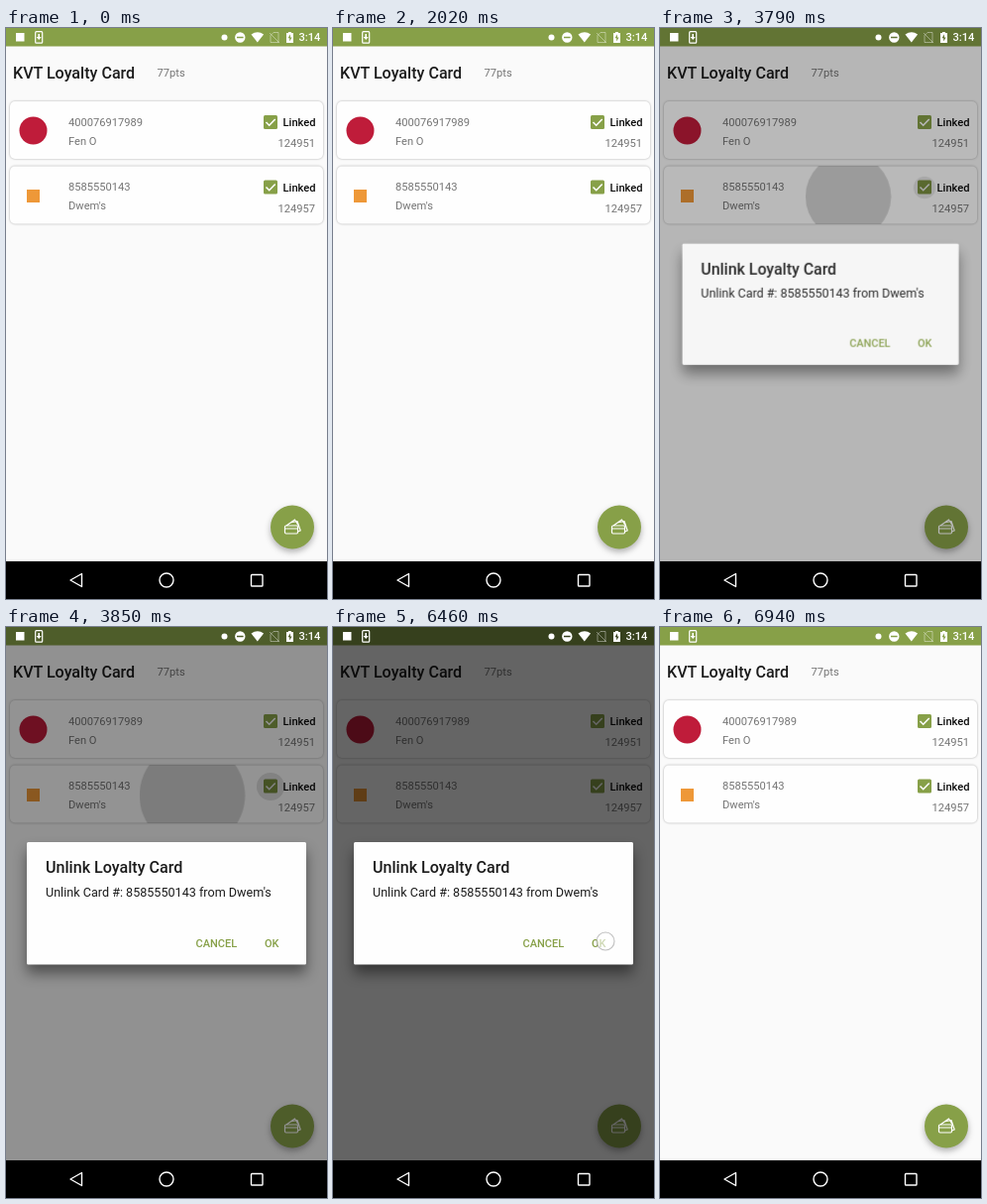
Recreate the animation shown at these times as an HTML page. Size 324 by 576 pixels, loop 8 s.

```html
<!DOCTYPE html>
<html lang="en">
<head>
<meta charset="utf-8">
<title>Loyalty cards</title>
<style>
  html, body { margin: 0; width: 100%; height: 100%; overflow: hidden; background: #fafafa; }
  svg { --green: #87a048; display: block; width: 100vw; height: 100vh; }
  text { font: 11.15px Roboto, sans-serif; fill: #757575; }
  .medium { font-weight: 500; }
  .title { font-size: 16.1px; font-weight: 500; fill: #1c1c1c; }
  .body { font-size: 12.6px; fill: #1c1c1c; }
  .dark { fill: #0c0c0c; }
  .action { font-size: 11px; font-weight: 500; fill: var(--green); }
  .end { text-anchor: end; }
  .green { fill: var(--green); }
  .card { fill: #fefefe; filter: drop-shadow(0 .8px .8px rgba(0, 0, 0, .32)); }
  .fab { fill: var(--green); filter: drop-shadow(0 3px 3px rgba(0, 0, 0, .3)); }
  .line { fill: none; stroke: #fff; stroke-width: 1.2; stroke-linejoin: round; }
  .panel { fill: #fefefe; filter: drop-shadow(0 9px 7px rgba(0, 0, 0, .45)); }
  .disc { fill: #fafafa; filter: drop-shadow(0 1.5px 1.5px rgba(0, 0, 0, .35)); }

  /* One shared 8 s clock: 1% = 80 ms */
  .anim { animation: 8s linear infinite both; }
  .dot { fill: rgba(255, 255, 255, .6); stroke: rgba(140, 140, 140, .55); stroke-width: 1.1; }
  .touch { animation-timing-function: step-end; }

  .pull { animation-name: pull-move; }
  .pull .touch { animation-name: pull-show; }
  @keyframes pull-show { 0% { opacity: 0 } 7.375% { opacity: 1 } 14.375%, 100% { opacity: 0 } }
  @keyframes pull-move {
    0%, 7.375% { transform: translate(176px, 230px); animation-timing-function: ease-in-out }
    13.75%, 100% { transform: translate(180px, 415px) }
  }

  .spinner { animation-name: spinner-drop; }
  @keyframes spinner-drop {
    0%, 7.375% { transform: translate(162.4px, 53px); opacity: 0; animation-timing-function: ease-in-out }
    7.5% { opacity: 1 }
    13.75%, 14.375% { transform: translate(162.4px, 148px); animation-timing-function: ease-out }
    16.9%, 23.375% { transform: translate(162.4px, 106px) scale(1); opacity: 1 }
    25.2%, 100% { transform: translate(162.4px, 106px) scale(0); opacity: 0 }
  }
  .arc { fill: none; stroke: #1c1c1c; stroke-width: 2; animation-name: arc-turn, arc-length; }
  @keyframes arc-turn {
    0%, 7.375% { transform: rotate(-110deg) }
    14.375% { transform: rotate(120deg) }
    25.25%, 100% { transform: rotate(560deg) }
  }
  @keyframes arc-length {
    0%, 7.375% { stroke-dasharray: 0 100; stroke-opacity: .3 }
    11% { stroke-opacity: .4 }
    12% { stroke-opacity: 1 }
    13.75%, 15% { stroke-dasharray: 80 100 }
    18% { stroke-dasharray: 6 100 }
    22% { stroke-dasharray: 75 100 }
    25.25%, 100% { stroke-dasharray: 20 100; stroke-opacity: 1 }
  }

  .tap-card { animation-name: tap-card; }
  @keyframes tap-card { 0% { opacity: 0 } 43.72% { opacity: 1 } 45.375%, 100% { opacity: 0 } }
  .tap-ok { animation-name: tap-ok; }
  @keyframes tap-ok { 0% { opacity: 0 } 80.72% { opacity: 1 } 83%, 100% { opacity: 0 } }

  .row-ripple { animation-name: row-ripple; }
  @keyframes row-ripple {
    0%, 44.5% { transform: translate(198px, 170px) scale(.05); opacity: 0 }
    45.2% { opacity: .16 }
    48.125% { transform: translate(188px, 170px) scale(.53); opacity: .16 }
    50.5% { opacity: .12 }
    54%, 100% { transform: translate(162px, 170px) scale(1.6); opacity: 0 }
  }
  .box-ripple { animation-name: box-ripple; }
  @keyframes box-ripple {
    0%, 44.5% { transform: translate(267px, 161px) scale(0); opacity: 0 }
    48.125% { transform: translate(267px, 161px) scale(.14); opacity: .12 }
    50.5% { opacity: .1 }
    54%, 100% { transform: translate(267px, 161px) scale(.2); opacity: 0 }
  }
  .ok-ripple { animation-name: ok-ripple; }
  @keyframes ok-ripple {
    0%, 82.25% { transform: translate(275px, 317px) scale(.05); opacity: 0 }
    82.8% { opacity: .14 }
    85%, 100% { transform: translate(268px, 318px) scale(.4); opacity: .14 }
  }

  .dim { animation-name: dim; }
  @keyframes dim {
    0%, 46% { opacity: 0 }
    48.125% { opacity: .42 }
    49.5%, 83.6% { opacity: .6 }
    86.6%, 100% { opacity: 0 }
  }
  .dialog { transform-origin: 162px 278px; animation-name: dialog; }
  @keyframes dialog {
    0%, 46% { opacity: 0; transform: scale(.9); animation-timing-function: ease-out }
    47.9%, 83.6% { opacity: 1; transform: none }
    85.6% { opacity: 0; transform: scale(.95) }
    100% { opacity: 0; transform: scale(.9) }
  }
</style>
</head>
<body>
<svg viewBox="0 0 324 576" preserveAspectRatio="none">
  <defs>
    <g id="row">
      <rect class="card" x="4" y="74" width="316" height="58" rx="5"/>
      <rect class="green" x="260" y="88" width="14" height="14" rx="1.5"/>
      <path d="M262.5 95l3.2 3.2 6-6.2" fill="none" stroke="#fff" stroke-width="1.6"/>
      <text class="dark medium" x="279.5" y="99">Linked</text>
    </g>
    <clipPath id="list-area"><rect y="72" width="324" height="466"/></clipPath>
    <clipPath id="row-area"><rect x="4" y="139.5" width="316" height="58" rx="5"/></clipPath>
    <clipPath id="ok-area"><rect x="243" y="304" width="50" height="28" rx="2"/></clipPath>
  </defs>

  <rect width="324" height="576" fill="#fafafa"/>
  <rect class="green" width="324" height="18.5"/>

  <text class="title" x="7" y="51">KVT Loyalty Card</text>
  <text x="152.5" y="49">77pts</text>

  <use href="#row"/>
  <circle cx="27.5" cy="103.5" r="14" fill="#bf1c3a"/>
  <text x="63" y="98.5">400076917989</text>
  <text x="63" y="117.5">Fen O</text>
  <text class="end" x="312" y="120">124951</text>

  <use href="#row" y="65.5"/>
  <rect x="21" y="163" width="13" height="13" fill="#ee9838"/>
  <text x="63" y="164">8585550143</text>
  <text x="63" y="183">Dwem's</text>
  <text class="end" x="312" y="185.5">124957</text>

  <g clip-path="url(#row-area)"><circle class="anim row-ripple" r="100"/></g>
  <circle class="anim box-ripple" r="100"/>

  <g clip-path="url(#list-area)">
    <g class="anim spinner">
      <circle class="disc" r="15.75"/>
      <circle class="anim arc" r="6.9" pathLength="100"/>
    </g>
  </g>

  <circle class="fab" cx="289" cy="503.5" r="22"/>
  <g class="line">
    <rect x="281.5" y="502" width="13" height="8" rx="1.2"/>
    <path d="M281.5 505h13M283 502l8.5-6 3.8 6M287 499l7-1.5 3.2 9.5-2.7 1"/>
  </g>

  <rect class="anim dim" width="324" height="538"/>

  <!-- Status bar -->
  <g fill="#fff">
    <rect x="10" y="5" width="8.5" height="8.5"/>
    <rect class="line" x="29.7" y="3.7" width="7" height="11.5" rx="1"/>
    <path d="M32.4 6h1.6v3h1.8l-2.6 3-2.6-3h1.8z"/>
    <circle cx="220.5" cy="9.5" r="3"/>
    <path fill-rule="evenodd" d="M241.5 9.5a5.2 5.2 0 1 1-10.4 0a5.2 5.2 0 1 1 10.4 0zM233 8.7v1.6h6.6V8.7z"/>
    <path d="M247.5 6.5q6.3-4.5 12.6 0l-6.3 8z"/>
    <path d="M270 4.5h5v10h-8V7.5zM266 5l10 10" fill="none" stroke="#fff" stroke-opacity=".4"/>
    <path fill-rule="evenodd" d="M283 5h2V4h3v1h2v10h-7zM287 6.3l-2.4 4h1.6v3.2l2.4-4h-1.6z"/>
    <text class="medium" x="295.5" y="13.2" style="fill:#fff">3:14</text>
  </g>

  <!-- Navigation bar -->
  <rect y="538" width="324" height="38"/>
  <g class="line" style="stroke-width:1.4">
    <path d="M76.5 550.5v13l-11.5-6.5z"/>
    <circle cx="162" cy="557" r="7"/>
    <rect x="247.5" y="551.5" width="11.5" height="11.5" rx=".8"/>
  </g>

  <g class="anim dialog">
    <rect class="panel" x="21" y="217" width="282" height="123.5" rx="1.5"/>
    <text class="title" x="40" y="248">Unlink Loyalty Card</text>
    <text class="body" x="40" y="272">Unlink Card #: 8585550143 from Dwem's</text>
    <g clip-path="url(#ok-area)"><circle class="anim ok-ripple" r="100"/></g>
    <text class="action" x="191.5" y="322.5">CANCEL</text>
    <text class="action" x="261" y="322.5">OK</text>
  </g>

  <g class="anim pull"><circle class="anim touch dot" r="9"/></g>
  <circle class="anim touch dot tap-card" cx="198" cy="170" r="9"/>
  <circle class="anim touch dot tap-ok" cx="275" cy="317" r="9"/>
</svg>
</body>
</html>
```
